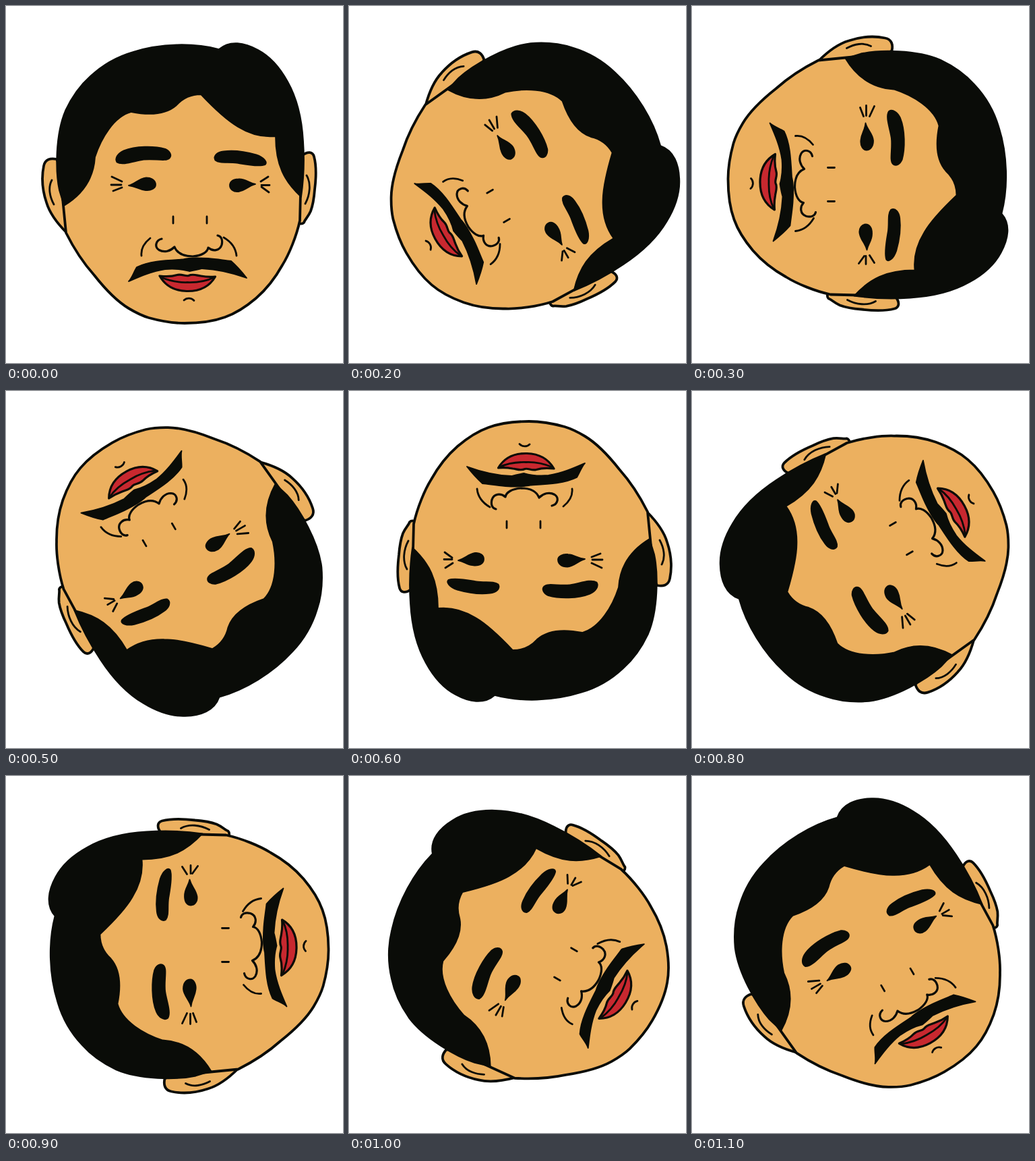
Write an HTML page that moves like this. It is 500 px wide and 529 px high and loops after 1.2 s.

```html
<!DOCTYPE html>
<html lang="en">
<head>
<meta charset="utf-8">
<title>Spinning head</title>
<style>
  html, body { margin: 0; width: 100%; height: 100%; overflow: hidden; background: #fff; }
  svg { display: block; width: 500px; height: 529px; }
  .skin { fill: #ecb05f; }
  .ink { fill: #0a0c08; }
  .lips { fill: #c8282f; }
  .line { fill: none; }
  #head { stroke: #0a0c08; stroke-width: 3.8; stroke-linecap: round; stroke-linejoin: round; }
  .mid { stroke-width: 3.2; }
  .thin { stroke-width: 2.8; }
  .flat { stroke-width: 1.8; }
</style>
</head>
<body>
<svg viewBox="0 0 500 529">
  <g id="head">
    <!-- ears -->
    <path class="skin" d="M75 227C66 225 58 227 56 237C52 256 55 276 60 291C65 308 78 324 90 336L110 300Z"/>
    <path class="skin" d="M440 221C448 215 455 216 457 223C461 238 460 256 458 272C457 285 455 296 452 304C448 313 443 317 442 321C440 323 437 323 434 322L420 280Z"/>
    <path class="line thin" d="M68 258C62 269 65 283 71 294M446 251C453 263 451 280 444 293"/>

    <!-- face -->
    <path class="skin" d="M84 285L89 336C100 358 114 380 131 399C146 418 162 436 182 448C192 454 202 459 212 462C230 467 247 470 265 470C285 470 306 468 325 461C342 455 358 444 371 433C386 420 400 402 410 384C420 368 431 341 436 318L437 278L400 150L290 100L170 130Z"/>

    <!-- hair -->
    <path class="ink flat" d="M86 296C111 281 130 259 132 224C141 196 160 164 186 157C211 162 236 162 253 147C263 136 274 131 289 131C307 150 325 168 344 179C362 190 381 195 400 193C400 236 413 260 438 283C442 256 443 228 441 200C439 165 431 135 418 112C406 90 391 74 374 65C354 54 332 50 316 64C278 54 229 55 188 68C164 75 142 88 125 104C108 119 96 138 88 155C73 190 73 245 79 273Z"/>

    <!-- brows -->
    <path class="ink mid" d="M165 231C162 226 166 219 175 215C192 208 220 208 236 212.500C242 215 246 221 242 225C237 230 220 225 204 227C190 229 173 236 165 231Z"/>
    <path class="ink mid" d="M311 228C308 222 314 217 323 216C339 214 357 217 371 221C383 225 387 232 384 234.500C375 238 355 234 343 232C330 230 317 233 311 228Z"/>

    <!-- eyes -->
    <path class="ink flat" d="M182 266C191 264 198 255 208 254.500C217 254.500 222 259 222 265C222 270 215 274 207 273C197 272 193 267 182 266Z"/>
    <path class="ink flat" d="M370 264C360 262 356 256 345 256.500C337 256.500 332 260 332 266C332 271 337 276 345 275C356 273 359 267 370 264Z"/>
    <path class="line thin" d="M157 253L172 260M156 265H171M159 274L172 269M378 260L389 253M379 265.500H391M379 268L390 276"/>

    <!-- nose and cheeks -->
    <path class="line thin" d="M248 312V322M298 312V322M214 344C204 352 200 361 201 370M323 343C335 350 341 360 342 370"/>
    <path class="line mid" d="M231 345C222 347 220 357 227 361.500C235 366 244 363 250 357C254 367 265 371 277 371C290 370 299 365 300 358C307 364 317 363 320 354C322 346 319 341 314 340"/>

    <!-- mustache -->
    <path class="ink flat" d="M182 408C187 403 190 393 194 387C212 378 235 377 262 375.500C273 372.500 285 373 300 374C313 375 324 377 334 378C342 385 350 394 357 403C338 396 312 390 291 389C284 391 278 392 272 393C262 390 248 389 236 390C216 393 198 401 182 408Z"/>

    <!-- mouth and chin -->
    <path class="lips mid" d="M228 400C237 401 246 401 254 398.500C261 396.500 266 401 271 399.500C277 396.500 282 399 289 400Q300 402 310.500 401C303 414 289 423 268 422.500C249 422 236 414 228 400Z"/>
    <path class="line thin" d="M230 402C242 407 254 410 269 409.500C286 410 299 407 309 402"/>
    <path class="line thin" d="M264 436C268 432 275 432 279 436.500"/>
  </g>
</svg>
<script>
  const STEP_MS = 100, STEPS = 12, CX = 266, CY = 257.5;
  // The head sits slightly off the pivot between quarter turns.
  const SHIFTS = [[0, 0], [2.2, -0.8], [4.4, -1.6]];
  const head = document.getElementById("head");

  function pose(time) {
    const step = Math.floor(time / STEP_MS) % STEPS;
    const [dx, dy] = SHIFTS[step % 3];
    head.setAttribute("transform",
      `translate(${CX} ${CY}) rotate(${step * 30}) translate(${dx - CX} ${dy - CY})`);
  }

  const start = performance.now();
  function tick() {
    pose(performance.now() - start);
    requestAnimationFrame(tick);
  }
  tick();
</script>
</body>
</html>
```
